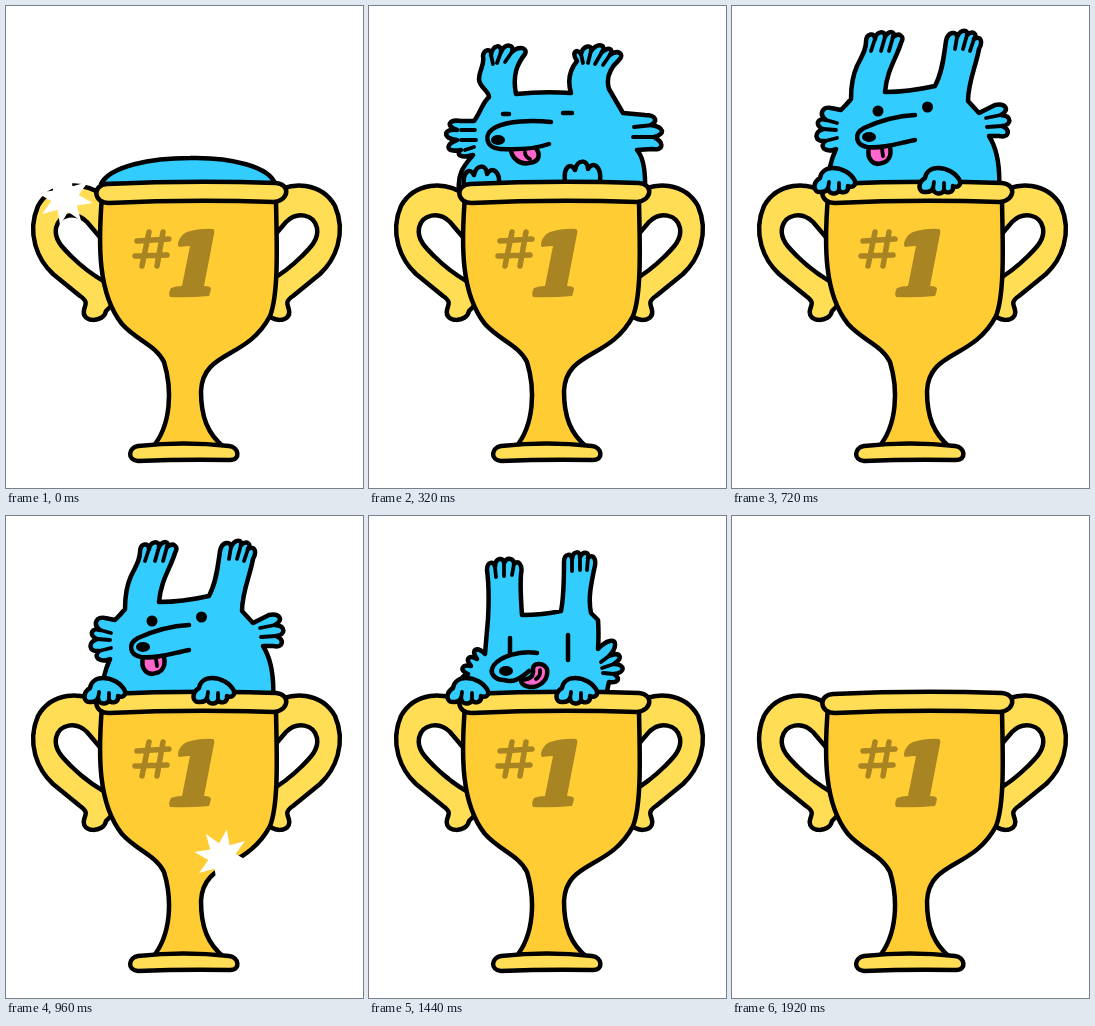
These frames come from a looping animation (357 by 482 pixels, 2400 ms). An HTML page:

```html
<!DOCTYPE html>
<html lang="en">
<head>
<meta charset="utf-8">
<title>Trophy</title>
<style>
  html, body { margin: 0; width: 100%; height: 100%; overflow: hidden; background: #fff; }
  svg { display: block; width: 100%; height: 100%; }
  .ink { stroke: #000; stroke-width: 4.5; stroke-linejoin: round; stroke-linecap: round; fill: none; }
  .thin { stroke-width: 3.8; }
  .blue { fill: #33ccff; }
  .pink { fill: #ff66cc; }
  .light { fill: #ffdd55; }
  .gold { fill: #ffcc33; }
  .mark { fill: #a88522; }
  .hash { stroke: #a88522; stroke-width: 5.5; stroke-linecap: round; fill: none; }
</style>
</head>
<body>
<svg viewBox="0 0 357 482">
  <defs>
    <clipPath id="above"><path d="M0 0H357V186H0Z"/></clipPath>
    <g id="handle">
      <path class="ink light" d="M98 190C75 173 45 177 32 200C20 228 32 254 47 268L74 290C83 296 79 299 78 304C75 317 98 317 100 305L106 299L112 260Z"/>
      <path class="ink" style="fill:#fff" d="M98 236L81 216C70 205 53 208 50 222C48 234 57 242 66 251Q80 265 99 276Z"/>
    </g>
    <g id="paw">
      <path class="ink blue" d="M22 10C18 2 9 -3 0 -3C-7 -3 -12 1 -13 7C-21 12 -20 22 -12 21C-9 21 -6 20 -5 17C-5 24 5 24 6 19C8 23 16 22 15 15C19 17 23 15 22 10Z"/>
      <path class="ink thin" d="M-4 11L-5 18M6 12L6 19"/>
    </g>
    <path id="backPaw" class="ink blue" d="M-18 18C-20 2 -12 -2 -8 6C-6 -5 5 -5 5 5C9 -3 19 1 17 18"/>
  </defs>

  <g clip-path="url(#above)">
    <path id="dome" class="ink blue" d="M95 178C104 160 145 152 184 152C225 151 264 161 269 178Z"/>
    <g id="squash">
      <path class="ink blue" d="M120 91C120 85 110 81 110 73C110 64 116 59 114 50C115 43 123 42 122 49C124 38 133 38 132 46C136 37 146 38 143 46C150 39 159 42 156 48C149 57 143 68 147 88Q174 85 202 87C199 77 199 66 208 55C202 46 208 42 212 48C214 39 224 38 222 45C229 36 238 39 233 46C240 40 245 43 241 49C249 43 256 48 250 54C239 64 237 73 240 83L254 107L276 109C287 109 289 115 282 119C295 121 297 128 285 131C296 137 294 145 283 143L268 144Q277 154 276 184H90C88 166 97 158 104 149C92 153 86 148 92 144C76 147 76 138 88 134C73 133 74 122 88 124C76 120 80 113 92 115L105 115C111 108 113 97 120 91Z"/>
      <path class="ink thin" d="M122 49l2 9M132 46l-4 11M143 46l-7 10M212 48l2 9M222 45l-3 12M233 46l-7 12M241 49l-7 10M92 124h14M92 134h15M96 144l9-3M265 121l19-2M264 131h20"/>
      <path class="ink" d="M134 108h6M194 107h9"/>
      <path class="ink pink" d="M142 143C142 152 151 159 160 157C171 156 172 148 166 141Z"/>
      <path class="ink thin" d="M156 146q0 5 5 7"/>
      <path class="ink blue" d="M182 116C162 114 139 115 127 121C113 128 117 142 131 143C150 144 166 143 180 138"/>
      <ellipse cx="129" cy="134" rx="7" ry="5"/>
      <use href="#backPaw" x="113" y="163"/>
      <use href="#backPaw" x="214" y="158"/>
    </g>
    <g id="happy">
      <path class="ink blue" d="M119 93C119 82 120 71 125 60C130 50 134 44 134 36C134 27 143 26 143 33C144 25 154 24 153 31C157 24 164 25 161 31C167 26 173 30 169 37C164 53 155 64 153 86Q176 86 203 80C211 65 212 48 214 35C216 25 225 25 225 31C229 22 237 24 235 29C241 24 246 28 242 33C249 29 251 36 247 43C244 60 236 76 236 95L247 107L263 99C274 97 278 104 269 109C280 110 280 119 270 120C279 124 277 132 267 130L257 130Q269 149 267 184H95Q96 160 104 143C93 147 87 141 93 135C82 136 82 126 91 123C82 119 86 111 94 114C86 108 91 100 99 102L109 104Q115 98 119 93Z"/>
      <path class="ink thin" d="M143 33l-4 12M153 31l-4 14M161 31l-4 14M225 31l-2 12M235 29l-4 14M242 33l-4 12M94 114l11 3M91 123l13 1M93 135l12-3M254 112l15-3M255 121l15-1"/>
      <circle cx="146" cy="105" r="5.5"/><circle cx="195.5" cy="101" r="5.5"/>
      <path class="ink pink" d="M137 141C134 154 142 160 150 157C159 155 160 146 157 138Z"/>
      <path class="ink thin" d="M150 143l1 7"/>
      <path class="ink blue" d="M183 109C164 110 145 116 132 122C121 128 124 139 135 141C151 143 167 137 183 134"/>
      <ellipse cx="137" cy="131" rx="7" ry="5"/>
    </g>
    <g id="duck">
      <path class="ink blue" d="M119 103C120 85 120 69 118 54C118 45 125 45 126 51C126 41 135 41 135 47C138 40 146 43 145 48C149 43 154 49 152 58C151 72 152 85 153 99Q174 99 192 95C195 80 195 65 195 46C195 37 203 37 203 43C204 34 212 35 211 41C215 34 221 37 219 42C225 37 228 44 225 54C222 69 219 82 222 97L229 104Q230 118 229 133C237 124 247 122 246 129Q246 134 240 140C251 135 255 142 245 148C256 148 257 157 245 158C252 163 249 167 240 166L236 184H95C94 174 100 169 108 166C91 169 89 161 99 158C89 154 94 148 102 150C95 142 101 139 108 143C101 133 108 130 116 138Z"/>
      <path class="ink thin" d="M126 51l1 10M135 47l0 13M145 48l-2 11M203 43l0 12M211 41l0 13M219 42l-1 12M240 140l-8 6M245 148l-12 4M245 158l-11-1"/>
      <path class="ink" d="M141 122v16M199 119v25"/>
      <path class="ink blue" d="M168 137C150 134 131 141 125 149C119 157 126 164 135 164C144 167 151 163 160 155"/>
      <path class="ink pink" d="M152 164C166 163 164 157 164 152C165 146 175 147 178 153C180 163 172 170 164 171C156 171 152 168 152 164Z"/>
      <path class="ink thin" d="M171 154q1 6-4 9"/>
      <ellipse cx="137" cy="155" rx="7" ry="5"/>
    </g>
  </g>

  <use href="#handle"/>
  <use href="#handle" transform="matrix(-1 0 0 1 361 0)"/>
  <path class="ink gold" d="M96 190C92 240 92 288 116 318C130 334 150 339 158 356C166 382 166 419 146 442H219C201 428 195 410 195 385C197 344 241 354 264 310C274 285 270 222 270 190Z"/>
  <path class="ink light" d="M132 440Q178 435 223 440C233 441 235 454 224 454Q178 453 132 455C121 454 122 442 132 440Z"/>
  <path class="ink light" d="M101 178Q185 174 270 177C284 178 284 194 268 196Q185 193 103 197C87 197 86 179 101 178Z"/>
  <path class="hash" d="M143 226L136 260M157 226L151 260M131 235L163 233M129 250L161 249"/>
  <path class="mark" d="M181 226Q195 222 207 223Q209 224 208 228L198 280Q205 280 205 283Q204 288 203 290Q182 292 164 291Q162 287 165 282Q170 280 176 280L184 240Q180 240 173 241Q171 239 173 234Q176 228 181 226Z"/>
  <g id="paws">
    <use id="leftPaw" href="#paw"/>
    <use href="#paw" x="206" y="165"/>
  </g>
  <path id="sparkles" fill="#fff"/>
</svg>
<script>
const STEP = 80, STEPS = 30;
const el = id => document.getElementById(id);

// [first step, pose, vertical offset]
const poses = [
  [0, 'dome', 0], [1, 'dome', -6], [2, 'squash', 55], [3, 'squash', 20], [4, 'squash', 0],
  [5, 'happy', 10], [6, 'happy', 0], [17, 'happy', 9], [18, 'duck', 0],
  [19, 'duck', 38], [20, 'duck', 90], [21, 'none', 0]
];

// [peak step, x, y]
const glints = [
  [0, 59, 192], [6, 146, 430], [12, 216, 341], [21, 302, 200], [22, 216, 341]
];

function star(x, y, radius) {
  const points = Array.from({ length: 16 }, (_, i) => {
    const angle = (i * 22.5 - 80) * Math.PI / 180;
    const r = i % 2 ? radius * 0.5 : radius;
    return `${(x + r * Math.cos(angle)).toFixed(1)} ${(y + r * Math.sin(angle)).toFixed(1)}`;
  });
  return `M${points.join('L')}Z`;
}

function render(ms) {
  const step = Math.floor(ms / STEP) % STEPS;
  const [, pose, dy] = poses.filter(p => p[0] <= step).pop();
  for (const id of ['dome', 'squash', 'happy', 'duck']) {
    el(id).style.display = id === pose ? '' : 'none';
    el(id).setAttribute('transform', `translate(0 ${dy})`);
  }

  el('paws').style.display = step >= 6 && step < 20 ? '' : 'none';
  el('leftPaw').setAttribute('transform', `translate(${step < 10 ? 101 : 97} 165)`);

  el('sparkles').setAttribute('d', glints.map(([peak, x, y]) => {
    const age = step - peak;
    if (Math.abs(age) > 1) return '';
    return star(x, y, age ? 15 : 28);
  }).join(''));
}

const start = performance.now();
function tick() {
  render(performance.now() - start);
  requestAnimationFrame(tick);
}
render(0);
requestAnimationFrame(tick);
</script>
</body>
</html>
```
